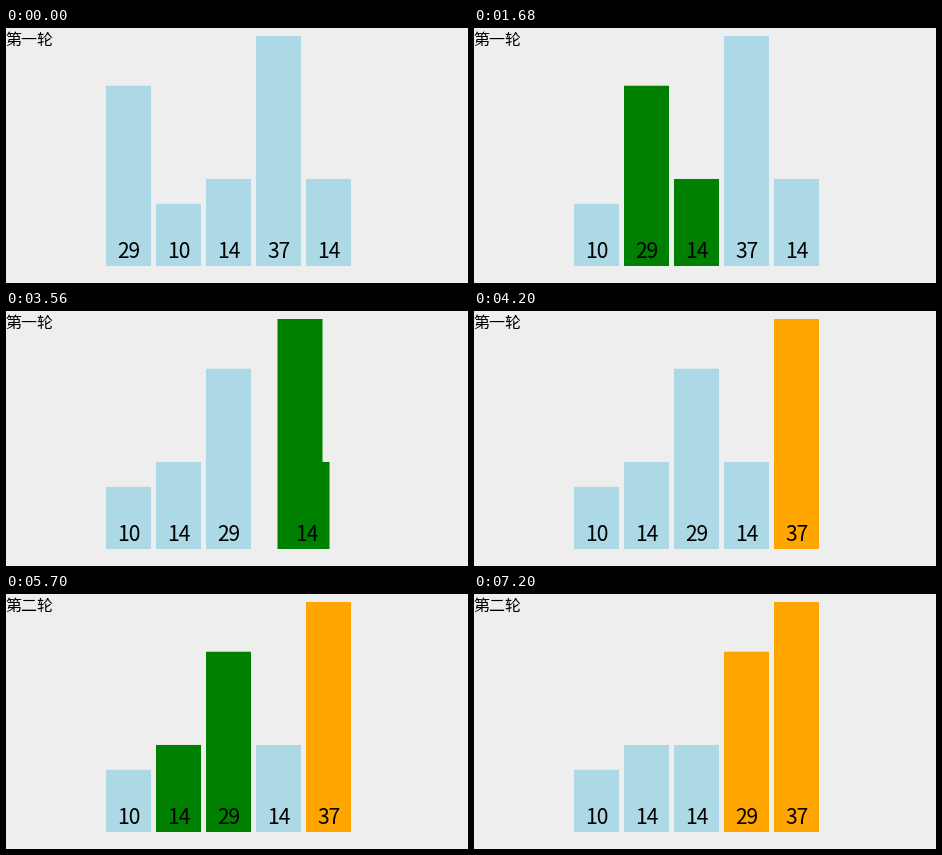
These frames come from a looping animation (462 px wide and 255 px high, 8000 ms). A matplotlib script:

```python
import matplotlib.pyplot as plt
import numpy as np
from matplotlib.animation import FuncAnimation
from matplotlib.colors import to_rgb
from matplotlib.patches import Rectangle

WIDTH, HEIGHT, DPI = 462, 255, 64
INTERVAL, LOOP = 20, 8000
FONT = "Noto Sans CJK JP"
VALUES = [29, 10, 14, 37, 14]
BASE, TALLEST, BAR_W, PITCH, LEFT = 238, 230, 45, 50, 100
IDLE, ACTIVE, DONE = (np.array(to_rgb(c)) for c in ("lightblue", "green", "orange"))
ROUND_TWO = 5090


def recolor(times, first=0.3, **bars):
    """Fade bars (b0, b1, ...) to new colours at the given step times."""
    return times, first, {int(k[1:]): c for k, c in bars.items()}, None


def swap(start, end, a, b, first=0.05):
    return np.linspace(start, end, 4), first, {}, (a, b)


def steps(start, end):
    return np.linspace(start, end, 3)


EVENTS = [
    recolor(steps(500, 650), b0=ACTIVE, b1=ACTIVE),
    swap(980, 1210, 0, 1),
    recolor(steps(1520, 1680), b1=IDLE, b2=ACTIVE),
    swap(2000, 2230, 0, 2),
    recolor((2470, 2590, 2620, 2700), first=-0.1, b2=IDLE, b3=ACTIVE),
    recolor(steps(3010, 3170), b0=IDLE, b4=ACTIVE),
    swap(3480, 3730, 3, 4, first=0.03),
    recolor(steps(4050, 4200), b4=IDLE, b3=DONE),
    recolor((5090, 5140), first=0.6, b1=ACTIVE, b2=ACTIVE),
    recolor(steps(5540, 5700), b1=IDLE, b0=ACTIVE),
    recolor(steps(6010, 6170), b2=IDLE, b4=ACTIVE),
    swap(6510, 6730, 0, 4),
    recolor(steps(7050, 7200), b4=IDLE, b0=DONE),
]


def progress(t, times, first):
    """Linear 200 ms transition, seen only at the step times."""
    if t >= times[-1]:
        return 1.0
    step = np.searchsorted(times, t, side="right") - 1
    return min(1.0, max(0.0, first + 0.4 * step))


def state(t):
    slots = np.arange(len(VALUES), dtype=float)
    colors = [IDLE] * len(VALUES)
    for times, first, targets, pair in EVENTS:
        if t < times[0]:
            break
        p = progress(t, times, first)
        for bar, color in targets.items():
            colors[bar] = colors[bar] + (color - colors[bar]) * p
        if pair:
            a, b = pair
            shift = (slots[b] - slots[a]) * p
            slots[a] += shift
            slots[b] -= shift
    return slots, colors


def px(size):
    return size * 72 / DPI


fig = plt.figure(figsize=(WIDTH / DPI, HEIGHT / DPI), dpi=DPI, facecolor="#eeeeee")
ax = fig.add_axes([0, 0, 1, 1])
ax.set_xlim(0, WIDTH)
ax.set_ylim(HEIGHT, 0)
ax.axis("off")

title = ax.text(0, 17, "", family=FONT, fontsize=px(16), color="black")
bars, labels = [], []
for i, value in enumerate(VALUES):
    height = TALLEST * value / max(VALUES)
    bar = Rectangle((0, BASE - height), BAR_W, height, lw=0, snap=False, zorder=i + 1)
    bars.append(ax.add_patch(bar))
    labels.append(ax.text(0, 230, str(value), family=FONT, fontsize=px(21),
                          color="black", ha="center", zorder=i + 1.5))


def update(frame):
    t = frame * INTERVAL + INTERVAL / 2
    title.set_text("第二轮" if t >= ROUND_TWO else "第一轮")
    for bar, label, slot, color in zip(bars, labels, *state(t)):
        x = LEFT + PITCH * slot
        bar.set_x(x)
        bar.set_facecolor(color)
        label.set_x(x + BAR_W / 2)
    return [title, *bars, *labels]


anim = FuncAnimation(fig, update, frames=LOOP // INTERVAL, interval=INTERVAL,
                     repeat=True, repeat_delay=0)
plt.show()
```
